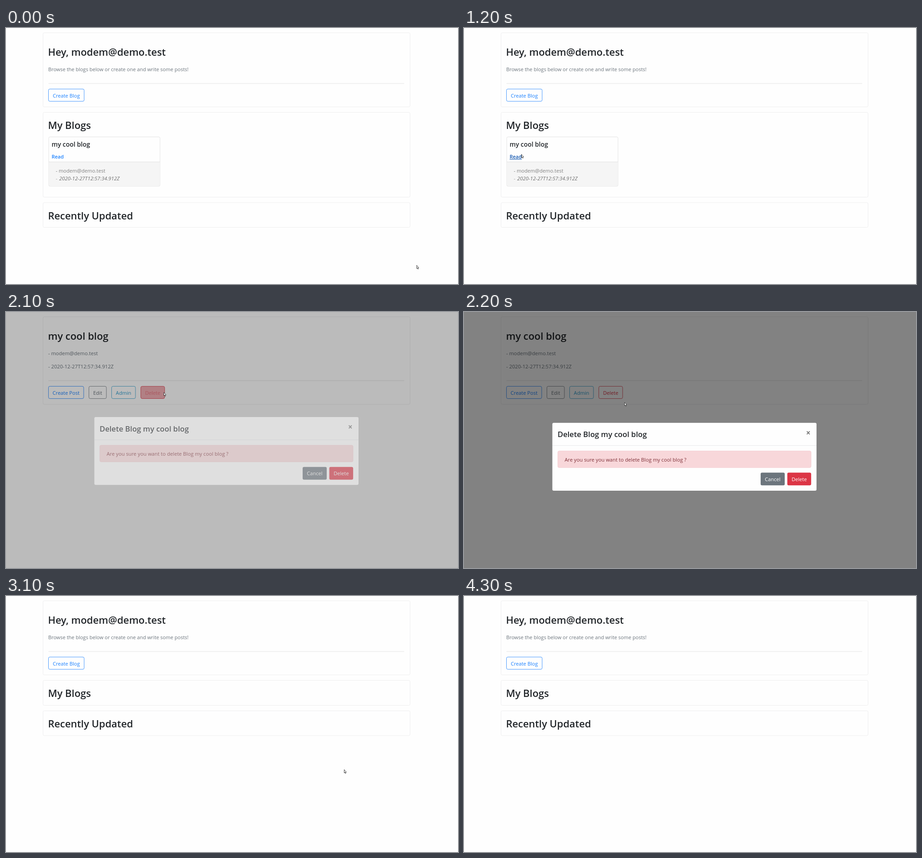
Recreate the animation shown at these times as an HTML page. Size 995 by 563 pixels, loop 4.5 s.

```html
<!DOCTYPE html>
<html lang="en">
<head>
<meta charset="utf-8">
<title>Blog demo</title>
<style>
  html, body { margin: 0; width: 100%; height: 100%; overflow: hidden; background: #fefefe; }
  svg { display: block; font-family: "Open Sans", "Noto Sans", sans-serif; }
</style>
</head>
<body>
<svg id="stage" width="995" height="563" viewBox="0 0 995 563"></svg>
<script>
const LOOP = 4500, STEP = 100, LAST = 4300;
const EMAIL = 'modem@demo.test', DATE = '2020-12-27T12:57:34.912Z', BLOG = 'my cool blog';
const INK = '#212529', GREY = '#6c757d', BLUE = '#1a80ff', RED = '#dc3545';
const stage = document.getElementById('stage');

// Pointer path: time, x, y
const path = [
  [0, 903.5, 521.5], [100, 890, 512], [600, 330, 318], [1000, 126, 277.5],
  [1200, 126, 277.5], [1300, 130, 275], [1800, 340, 180], [2000, 347, 176.5],
  [2100, 347, 176.5], [2200, 353, 198.5], [2700, 735, 378], [3000, 750, 381.5],
  [3100, 744, 381.5], [3600, 545, 500], [3900, 470, 570]
];

const clamp = v => Math.max(0, Math.min(1, v));

function pointerAt(t) {
  const next = path.findIndex(p => p[0] > t);
  if (next < 0) return path[path.length - 1].slice(1);
  const a = path[next - 1], b = path[next], k = (t - a[0]) / (b[0] - a[0]);
  return [a[1] + (b[1] - a[1]) * k, a[2] + (b[2] - a[2]) * k];
}

const text = (x, y, label, size = 11.1, fill = GREY, extra = '') =>
  `<text x="${x}" y="${y}" font-size="${size}" fill="${fill}" ${extra}>${label}</text>`;
const heading = (x, y, label, size = 21.9) => text(x, y, label, size, INK, 'font-weight="600"');
const box = (x, y, w, h, fill, stroke = 'none', r = 3, extra = '') =>
  `<rect x="${x}" y="${y}" width="${w}" height="${h}" rx="${r}" fill="${fill}" stroke="${stroke}" ${extra}/>`;
const panel = (top, bottom) => box(81.5, top, 808, bottom - top, 'none', '#eeeeef');
const line = (x, y, w, color) => `<path d="M${x} ${y}h${w}" stroke="${color}"/>`;
const centered = (x, y, label, fill, size) => text(x, y, label, size, fill, 'text-anchor="middle"');

// An outlined button; hover (0 to 1) fills it and whitens the label.
const outlined = (x, y, w, label, color, hover = 0) =>
  box(x, y, w, 27, color, color, 3, `fill-opacity="${hover}" stroke-opacity=".8"`) +
  centered(x + w / 2, y + 18.3, label, color) +
  (hover ? `<g opacity="${hover}">${centered(x + w / 2, y + 18.3, label, '#fff')}</g>` : '');

const solid = (x, y, w, label, color) =>
  box(x, y, w, 28, color) + centered(x + w / 2, y + 18.7, label, '#fff');

function blogCard(linkHover) {
  const link = linkHover ? 'font-weight="600" text-decoration="underline"' : 'font-weight="600"';
  return box(94, 239.5, 245, 108.5, '#fefefe', '#e4e4e4') +
    '<path d="M94.5 294.5h244v50q0 3-3 3h-238q-3 0-3-3z" fill="#f5f5f5"/>' +
    line(94, 294.5, 245, '#e2e2e2') +
    heading(100.5, 261, BLOG, 13.9) +
    text(100.5, 287, 'Read', 11, linkHover ? '#1257b0' : BLUE, link) +
    text(109.5, 318, '- ' + EMAIL, 11.1, '#808080') +
    text(109.5, 335, '- ', 11.1, '#a0a0a0') +
    text(117, 335, DATE, 11.3, '#707070', 'font-style="italic"');
}

function homePage(hasBlog, linkHover) {
  const split = hasBlog ? 372 : 240.5;
  return panel(10.5, 173.5) +
    heading(92.5, 61, 'Hey, ' + EMAIL) +
    text(93, 95, 'Browse the blogs below or create one and write some posts!', 11.03) +
    line(93.5, 122, 783, '#e3e3e3') +
    outlined(93.5, 134.2, 78.5, 'Create Blog', BLUE) +
    panel(185.5, split) + heading(92.5, 222.3, 'My Blogs') +
    (hasBlog ? blogCard(linkHover) : '') +
    panel(split + 12, split + 66.5) + heading(92.5, split + 48.8, 'Recently Updated');
}

function blogPage(deleteHover) {
  return panel(10.5, 203) +
    heading(92.5, 61, BLOG) +
    text(93, 95, '- ' + EMAIL) +
    text(93, 123.5, '- ' + DATE, 11.2) +
    line(93.5, 151, 783, '#e3e3e3') +
    outlined(93.5, 163.4, 77.5, 'Create Post', BLUE) +
    outlined(182.5, 163.4, 38.5, 'Edit', GREY) +
    outlined(232.5, 163.4, 52.5, 'Admin', '#2f9fd0') +
    outlined(296.7, 163.4, 52.5, 'Delete', RED, deleteHover);
}

function modal(t, hover) {
  const fade = clamp((t - 2018) / 150);
  if (!fade) return '';
  const drop = 36.9 * (1 - clamp((t - 2005) / 330)) ** 1.6;
  return `<rect width="995" height="563" fill="#000" opacity="${0.49 * fade}"/>
    <g opacity="${fade}" transform="translate(0 ${252.5 - drop})">` +
    box(194.5, 0, 581.5, 149.3, '#fefefe') +
    heading(206, 31.6, 'Delete Blog ' + BLOG, 16.6) +
    centered(757.8, 28, '<tspan font-weight="700">×</tspan>', '#777', 17) +
    line(195, 50, 581, '#e6e8ea') +
    box(206.5, 62, 557.5, 36.5, '#f8d7da', '#f5cfd3') +
    text(221.5, 85, 'Are you sure you want to delete Blog ' + BLOG + ' ?', 11.2, '#7f3038') +
    solid(653, 109.6, 53, 'Cancel', GREY) +
    solid(711.7, 109.6, 52.5, 'Delete', hover ? '#c82333' : RED) +
    '</g>';
}

function draw(t) {
  const [x, y] = pointerAt(t);
  let scene;
  if (t < 1300) {
    scene = homePage(true, t >= 1000);
  } else if (t < 3100) {
    const over = x > 297 && x < 350 && y < 191;
    const deleteHover = t === 2100 ? 0.4 : over && t < 2100 ? 1 : 0;
    scene = blogPage(deleteHover) + modal(t, x > 712 && y > 362);
  } else {
    scene = homePage(false);
  }
  stage.innerHTML = scene + `<path transform="translate(${x} ${y})" fill="#fff" stroke="#333"
    stroke-width=".9" stroke-linejoin="round" d="M.5.3V7.6L2 6.2 3.2 8.8 4.3 8.3 3.2 5.8H5.2Z"/>`;
}

const start = performance.now();
let shown = -1;
function tick() {
  const elapsed = Math.max(0, performance.now() - start) % LOOP;
  const t = Math.min(LAST, Math.floor(elapsed / STEP) * STEP);
  if (t !== shown) draw(shown = t);
  requestAnimationFrame(tick);
}
tick();
</script>
</body>
</html>
```
